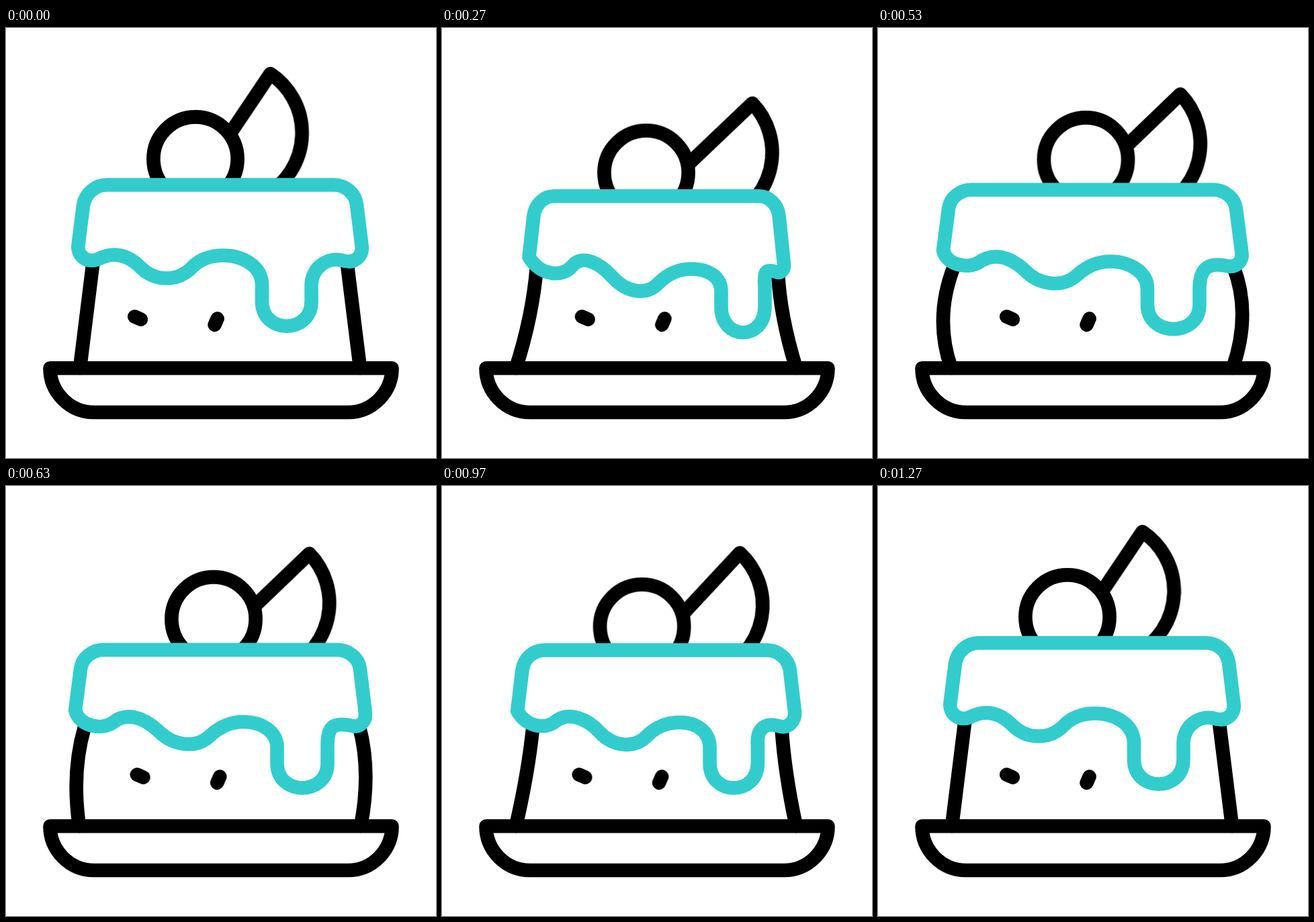
Write an HTML page without scripts that moves like this. It is 640 px wide and 640 px high and loops after 1670 ms.

```html
<!DOCTYPE html>
<html lang="en">
<head>
<meta charset="utf-8">
<title>Wobbling cake</title>
<style>
html, body { margin: 0; width: 100%; height: 100%; overflow: hidden; background: #fff; }
svg { display: block; width: 100vw; height: 100vh; }
svg * { stroke-linecap: round; stroke-linejoin: round; }
.ink { fill: none; stroke: #000; stroke-width: 20.6; }
#cherry, #icing { fill: #fff; }
#icing { stroke: #33cccd; }
#leaf, #cherry, #body, #icing, #crumbs {
  animation: 1.67s cubic-bezier(.33, .5, .67, 1) infinite;
}
#leaf { animation-name: leaf; }
#cherry { animation-name: cherry; }
#body { animation-name: body; }
#icing { animation-name: icing; }
#crumbs { animation-name: crumbs; }

/* Sink, bulge, sink again, settle. */
@keyframes leaf {
  0%, 76.05%, 100% { transform: translate(393.5px, 68px); animation-timing-function: cubic-bezier(.33, 0, .67, 1); }
  16.17% { transform: translate(462px, 112px) rotate(12.5deg); animation-timing-function: cubic-bezier(.33, 0, .67, .5); }
  25.75% { transform: translate(455.5px, 101.5px) rotate(12.3deg); }
  31.9% { transform: translate(450px, 98.5px) rotate(12.2deg); animation-timing-function: cubic-bezier(.33, 0, .67, .5); }
  37.72% { transform: translate(451.5px, 100.5px) rotate(12.3deg); }
  49.7% { transform: translate(462px, 112px) rotate(12.5deg); animation-timing-function: cubic-bezier(.33, 0, .67, .5); }
  64.07% { transform: translate(417px, 82px) rotate(4.2deg); }
}
@keyframes cherry {
  0%, 76.05%, 100% { transform: translate(282px, 195px); animation-timing-function: cubic-bezier(.33, 0, .67, 1); }
  16.17% { transform: translate(304px, 215.3px); animation-timing-function: cubic-bezier(.33, 0, .67, .5); }
  25.75% { transform: translate(308.2px, 201.5px); }
  31.9% { transform: translate(309.5px, 196px); animation-timing-function: cubic-bezier(.33, 0, .67, .5); }
  37.72% { transform: translate(309px, 198px); }
  49.7% { transform: translate(305px, 213.3px); animation-timing-function: cubic-bezier(.33, 0, .67, .5); }
  64.07% { transform: translate(287.3px, 203.3px); }
}
@keyframes crumbs {
  0%, 76.05%, 100% { transform: translate(0); animation-timing-function: cubic-bezier(.33, 0, .67, 1); }
  16.17% { transform: translate(16.8px); animation-timing-function: cubic-bezier(.33, 0, .67, .5); }
  25.75% { transform: translate(4.8px); }
  31.9% { transform: translate(0); animation-timing-function: cubic-bezier(.33, 0, .67, .5); }
  37.72% { transform: translate(3.5px); }
  49.7% { transform: translate(16.4px); animation-timing-function: cubic-bezier(.33, 0, .67, .5); }
  64.07% { transform: translate(7px); }
}
@keyframes body {
  0%, 76.05%, 100% { d: path("M130 345Q120 426 110 506M507 345Q517 426 527 506"); animation-timing-function: cubic-bezier(.33, 0, .67, 1); }
  16.17% { d: path("M141 355Q135 428 110 506M500 363Q503 428 527 506"); animation-timing-function: cubic-bezier(.33, 0, .67, .5); }
  25.75% { d: path("M120 355Q103 420 109 506M522 358Q536 410 528 506"); }
  31.9% { d: path("M113 355Q83 432 109 506M529 355Q556 425 528 506"); animation-timing-function: cubic-bezier(.33, 0, .67, .5); }
  37.72% { d: path("M117 358Q97 425 109 506M526 358Q544 425 528 506"); }
  49.7% { d: path("M137 365Q130 435 110 506M505 365Q509 435 527 506"); animation-timing-function: cubic-bezier(.33, 0, .67, .5); }
  64.07% { d: path("M133 350Q126 415 110 506M506 350Q511 415 527 506"); }
}
@keyframes icing {
  0%, 76.05%, 100% {
    d: path("M150 233.5L488 233.5C505 233.5 520 246 522 263L529.5 324C531.5 339 520 350 505 347C478 338 454.5 358 454.5 383L454.5 407C454.5 456 381 456 381 407L381 383C381 354 352 338.5 323 338.5C303 338.5 288 345 277 356C256 378 222 378 200 356C183 339 162 331 137 344C121 351 105.5 339 107.5 323L115 264C118 246 133 233.5 150 233.5Z");
    animation-timing-function: cubic-bezier(.33, 0, .67, 1);
  }
  16.17% {
    d: path("M167 250.3L472 250.3C487 250.3 499.5 263 501.5 279L509 351C510 362 503 365.5 497 363C482 358 478.5 362 480.5 385L480.5 415C480.5 466 415.5 466 415.5 415L415.5 392C415.5 370 396 358.5 371 358.5C350 358.5 334 368 322 380C305 398 276 395 254 371C235 350 209 336 194 354C181 371 147 370 129.5 341L136.5 279C139 262 152 250.3 167 250.3Z");
    animation-timing-function: cubic-bezier(.33, 0, .67, .5);
  }
  25.75% {
    d: path("M150 243.8L488 243.8C505 243.8 519 256 521.5 272L529.5 338C530.5 350 525 360 515 357C485 350 479.5 360 479.5 389L479.5 413C479.5 461.5 406.5 461.5 406.5 413L406.5 389C406.5 365 380 351 353 351C332 351 315 361 304 372C284 391 251 387 229 365C205 342 180 337 160 352C146 364 114 358 108.5 335L117 272C119 256 133 243.8 150 243.8Z");
  }
  31.9% {
    d: path("M139 240.8L499 240.8C516 240.8 531 253 533 269L541.5 335C543 347 533 357 521 354.5C489 347 478.5 360 478.5 389L478.5 412C478.5 460 401 460 401 412L401 388C401 363 374 347.5 346 347.5C325 347.5 308 357 296 368C275 387 240 383 219 361C195 339 171 334 150 349C134 359 102 353 97 331L105 269C107 253 122 240.8 139 240.8Z");
    animation-timing-function: cubic-bezier(.33, 0, .67, .5);
  }
  37.72% {
    d: path("M145 243.8L493 243.8C510 243.8 525 256 527 272L535 338C536 350 527 360 516 357C484 350 478.5 360 478.5 389L478.5 413C478.5 461.5 403.5 461.5 403.5 413L403.5 389C403.5 365 380 351 353 351C332 351 315 361 303 372C283 391 249 387 227 365C203 342 178 337 159 352C143 364 109 358 103 334L111 272C113 256 128 243.8 145 243.8Z");
  }
  49.7% {
    d: path("M155 250L481 250C498 250 513 263 515.5 279L522.5 342C524 356 512 367 501 363C481 357 475 362 478 385L478 415C478 465 407.5 465 407.5 415L407.5 392C407.5 372 394 358.5 370 358.5C350 358.5 331 368 320 380C303 398 274 395 252 371C233 349 202 336 187 353C171 370 137 368 114.5 341L122 279C124 262 138 250 155 250Z");
    animation-timing-function: cubic-bezier(.33, 0, .67, .5);
  }
  64.07% {
    d: path("M150 236.5L487 236.5C504 236.5 519 249 521 266L528.5 327C530 342 519 353 505 350C480 342 458.5 360 458.5 386L458.5 409C458.5 457.5 386 457.5 386 409L386 386C386 358 360 342.5 331 342.5C310 342.5 296 349 285 360C265 381 230 381 209 359C191 341 168 334 143 347C125 355 106 342 109 326L116 266C119 248 133 236.5 150 236.5Z");
  }
}
</style>
</head>
<body>
<svg viewBox="0 0 640 640">
  <path id="leaf" class="ink" d="M-76 113L0 0A106 106 0 0 1 -6 180"/>
  <circle id="cherry" class="ink" r="62.6"/>
  <path id="body" class="ink"/>
  <path id="icing" class="ink"/>
  <path id="crumbs" class="ink" d="M191.3 429.5L200.7 433.7M314.6 432.5L310.6 441.8"/>
  <path class="ink" d="M65.5 506.3H574.5C574.5 542.5 545 572 509 572H131C95 572 65.5 542.5 65.5 506.3Z"/>
</svg>
</body>
</html>
```
